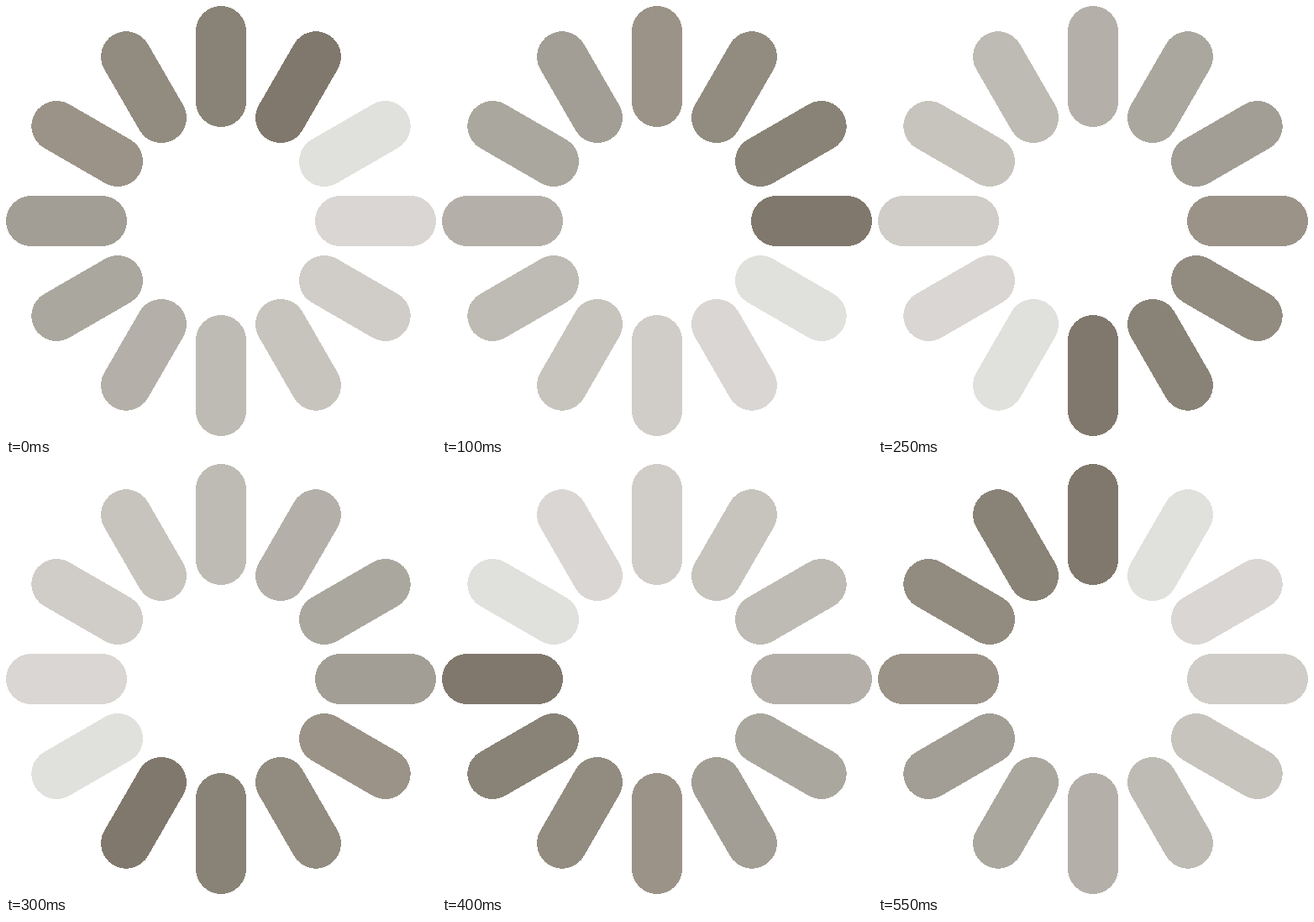
Animation of 512 by 512 pixels, one loop 600 ms. Source, as an HTML page:

```html
<!DOCTYPE html>
<html lang="en">
<head>
<meta charset="utf-8">
<title>Spinner</title>
<style>
  html, body { margin: 0; height: 100%; overflow: hidden; background: #fff; }
  svg { display: block; width: 100vw; height: 100vh; }
  line { stroke-width: 60; stroke-linecap: round; shape-rendering: crispEdges; }
</style>
</head>
<body>
<svg viewBox="-256 -256 512 512"></svg>
<script>
const STEP_MS = 50;
// From the leading bar back to the end of the tail
const shades = ['#80786c', '#898377', '#928b80', '#9b9388', '#a29e95', '#aaa79e',
                '#b4b0a9', '#bdbbb3', '#c7c4bd', '#d0cdc8', '#d9d6d3', '#e0e0dd'];
const count = shades.length;
const svg = document.querySelector('svg');

const bars = shades.map((_, i) => {
  const bar = document.createElementNS(svg.namespaceURI, 'line');
  bar.setAttribute('y1', -226);
  bar.setAttribute('y2', -142);
  bar.setAttribute('transform', `rotate(${i * 360 / count})`);
  return svg.appendChild(bar);
});

function draw() {
  const lead = 1 + Math.floor(performance.now() / STEP_MS) % count;
  bars.forEach((bar, i) => bar.setAttribute('stroke', shades[(lead - i + count) % count]));
  requestAnimationFrame(draw);
}
draw();
</script>
</body>
</html>
```
